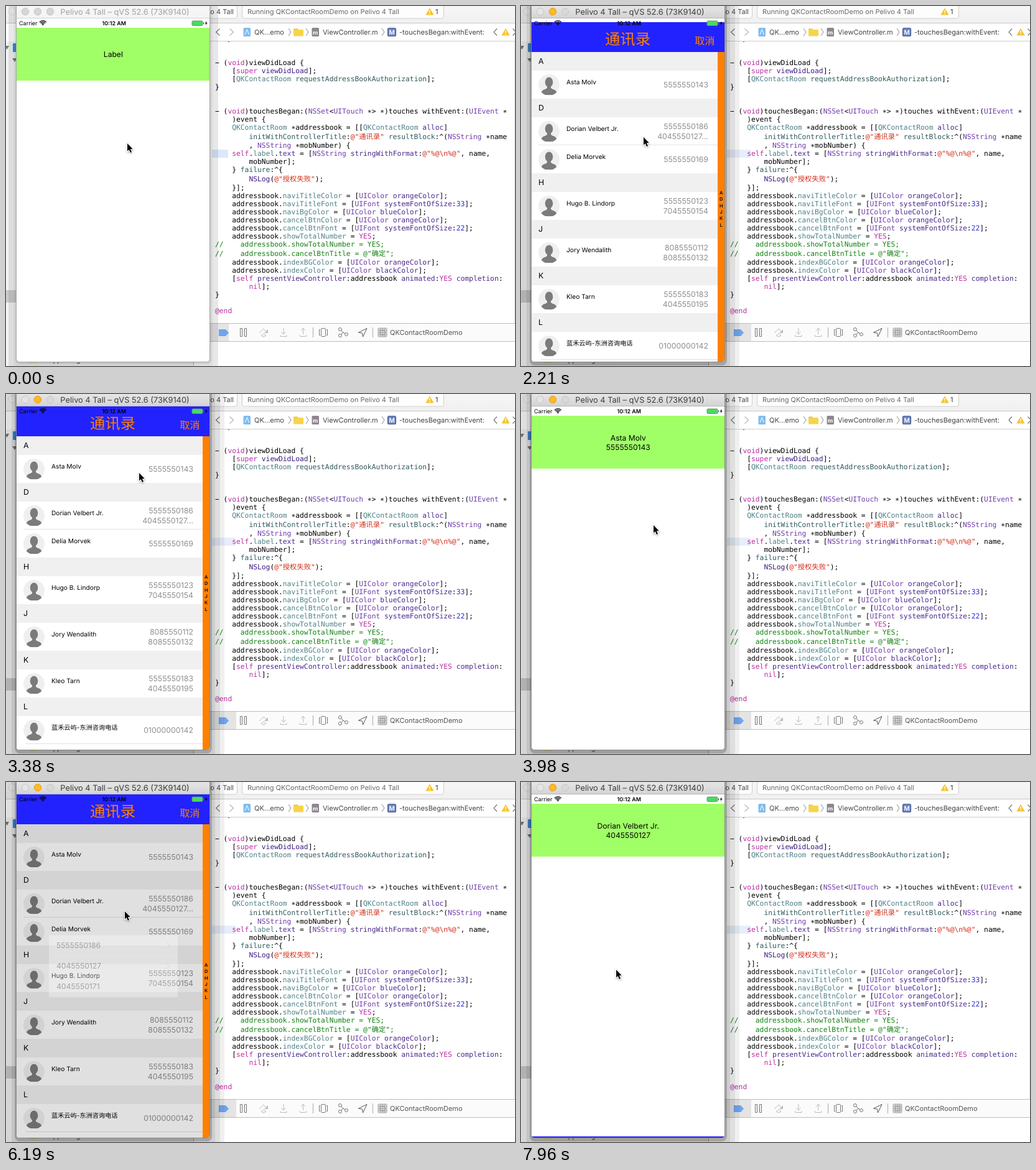
Recreate the animation shown at these times as an HTML page with a canvas. Size 818x579 px, loop 8000 ms.

```html
<!DOCTYPE html>
<html lang="en">
<head>
<meta charset="utf-8">
<title>Contact picker demo</title>
<style>
html, body { margin: 0; width: 100%; height: 100%; overflow: hidden; background: #fff; }
canvas { display: block; }
</style>
</head>
<body>
<canvas id="stage" width="818" height="579"></canvas>
<script>
const ctx = document.getElementById('stage').getContext('2d');
const LOOP = 8000, STEP = 147.4;
const SANS = 'Inter, "Noto Sans CJK SC", "Noto Sans CJK", sans-serif';
const MONO = '"DejaVu Sans Mono", "Noto Sans CJK SC", "Noto Sans CJK", monospace';
const SCREEN = { x: 17, y: 20, w: 310, h: 552 };
const BLUE = '#2222ff', ORANGE = '#ff8000';

// ---- drawing helpers ----
function rect(x, y, w, h, fill) {
  ctx.fillStyle = fill;
  ctx.fillRect(x, y, w, h);
}
function round(x, y, w, h, r, fill, stroke) {
  ctx.beginPath();
  ctx.roundRect(x, y, w, h, r);
  paint(fill, stroke);
}
function disc(x, y, r, fill, stroke) {
  ctx.beginPath();
  ctx.arc(x, y, r, 0, Math.PI * 2);
  paint(fill, stroke);
}
function poly(points, fill, stroke, open) {
  ctx.beginPath();
  for (let i = 0; i < points.length; i += 2) ctx.lineTo(points[i], points[i + 1]);
  if (!open) ctx.closePath();
  paint(fill, stroke);
}
function paint(fill, stroke) {
  if (fill) { ctx.fillStyle = fill; ctx.fill(); }
  if (stroke) { ctx.strokeStyle = stroke; ctx.stroke(); }
}
// y is the vertical middle of the capitals
function text(s, x, y, size, color, align = 'left', weight = 400) {
  ctx.font = `${weight} ${size}px ${SANS}`;
  ctx.textAlign = align;
  ctx.fillStyle = color;
  ctx.fillText(s, x, y + size * 0.365);
}
function chevron(x, y, w, h, color) {
  poly([x - w / 2, y - h / 2, x + w / 2, y, x - w / 2, y + h / 2], null, color, true);
}
function warning(x, y) {
  ctx.lineJoin = 'round';
  poly([x, y - 5, x + 5.8, y + 5, x - 5.8, y + 5], '#f7c32e', '#f7c32e');
  ctx.lineJoin = 'miter';
  rect(x - 0.7, y - 2.5, 1.4, 4, '#fff');
  rect(x - 0.7, y + 2.6, 1.4, 1.4, '#fff');
}

// ---- code editor ----
// the wide minus and centred asterisk mimic the editor font
const CODE = `- (void)viewDidLoad {
    [super viewDidLoad];
    [QKContactRoom requestAddressBookAuthorization];
}


- (void)touchesBegan:(NSSet<UITouch *> *)touches withEvent:(UIEvent *
    )event {
    QKContactRoom *addressbook = [[QKContactRoom alloc]
        initWithControllerTitle:@"通讯录" resultBlock:^(NSString *name
        , NSString *mobNumber) {
    self.label.text = [NSString stringWithFormat:@"%@\\n%@", name,
        mobNumber];
    } failure:^{
        NSLog(@"授权失败");
    }];
    addressbook.naviTitleColor = [UIColor orangeColor];
    addressbook.naviTitleFont = [UIFont systemFontOfSize:33];
    addressbook.naviBgColor = [UIColor blueColor];
    addressbook.cancelBtnColor = [UIColor orangeColor];
    addressbook.cancelBtnFont = [UIFont systemFontOfSize:22];
    addressbook.showTotalNumber = YES;
//    addressbook.showTotalNumber = YES;
//    addressbook.cancelBtnTitle = @"确定";
    addressbook.indexBGColor = [UIColor orangeColor];
    addressbook.indexColor = [UIColor blackColor];
    [self presentViewController:addressbook animated:YES completion:
        nil];
}

@end`.replace(/\*/g, '∗').replace(/^- /gm, '− ').split('\n');

const RULES = [
  [/^\/\/.*/, '#128212'],
  [/^@"[^"]*"/, '#d12f1b'],
  [/^(void|super|self|YES|nil|@end)\b/, '#ba2da2'],
  [/^(NSLog\b|viewDidLoad(?=]))/, '#3d1d81'],
  [/^(NS|UI)[A-Z]\w*/, '#703daa'],
  [/^QKContactRoom\b/, '#4f8187'],
  [/^(label|(navi|cancelBtn|index|showTotal)[A-Z]\w*)\b/, '#4f8187'],
  [/^(text|alloc|stringWithFormat|systemFontOfSize|presentViewController|animated|completion|(orange|blue|black)Color)\b/, '#4b2a8c'],
  [/^(initWithControllerTitle|resultBlock|failure|requestAddressBookAuthorization)\b/, '#31595d'],
  [/^\d+/, '#272ad8'],
  [/^(\w+|\s+|.)/, '#000']
];
function tokens(line) {
  const out = [];
  while (line) {
    const [re, color] = RULES.find(r => r[0].test(line));
    const word = line.match(re)[0];
    out.push([word, color]);
    line = line.slice(word.length);
  }
  return out;
}
const LINES = CODE.map(tokens);

function drawCode() {
  ctx.font = `11.3px ${MONO}`;
  ctx.textAlign = 'left';
  let y = 95;
  LINES.forEach((line, i) => {
    const tall = /[\u4e00-\u9fff]/.test(CODE[i]);
    if (tall) y += 2;
    let x = 336;
    for (const [word, color] of line) {
      ctx.fillStyle = color;
      ctx.fillText(word, x, y);
      x += ctx.measureText(word).width;
    }
    y += tall ? 14 : 13;
  });
}

function drawTopBars() {
  const g = ctx.createLinearGradient(0, 0, 0, 28);
  g.addColorStop(0, '#f6f6f6');
  g.addColorStop(1, '#f0f0f0');
  rect(0, 0, 818, 28, g);
  round(250.5, -8.5, 121, 28.5, 4, '#fdfdfd', '#cfcfcf');
  text('Pelivo 4 Tall', 366, 9, 11, '#4a4a4a', 'right');
  round(379.5, -8.5, 324, 28.5, 4, '#fdfdfd', '#cfcfcf');
  text('Running QKContactRoomDemo on Pelivo 4 Tall', 388, 9, 11, '#6a6a6a');
  warning(681, 9);
  text('1', 690, 9, 11, '#333');
  disc(10, 8.5, 6, '#f4f4f4', '#dcdcdc');

  rect(0, 27, 818, 1, '#c9c9c9');
  rect(0, 28, 818, 28, '#fff');
  rect(328, 56, 490, 1, '#cfcfcf');
  ctx.lineWidth = 1.2;
  chevron(340.5, 42, -6, 11, '#777');
  chevron(362.5, 42, 6, 11, '#b5b5b5');
  round(381.5, 35, 11.5, 14, 1.5, '#7fbcef');
  poly([384, 46, 387.3, 38, 390.6, 46], null, '#e4f2ff', true);
  text('QK...emo', 399, 42, 11, '#444');
  round(462, 36.5, 7, 4, 1, '#e8c030');
  round(462, 38, 16, 10.5, 1, '#f6d44c');
  round(491.5, 35, 11.5, 14, 1.5, '#8f8790');
  text('m', 497.2, 43, 9, '#fff', 'center', 700);
  text('ViewController.m', 509, 42, 11, '#444');
  for (const x of [456, 484, 606]) chevron(x, 42, 4, 12, '#a5a5a5');
  round(613.5, 35.5, 13, 13, 2, '#6d84bd', '#4a62a0');
  text('M', 620, 42, 10, '#fff', 'center', 600);
  text('-touchesBegan:withEvent:', 632, 42, 11, '#444');
  chevron(786.5, 42, -5, 11, '#777');
  warning(803, 42);
  chevron(817, 42, 5, 11, '#777');
  ctx.lineWidth = 1;
}

function drawDebugBar(edge) {
  rect(328, 511, 490, 28, '#fbfbfb');
  rect(328, 510, 490, 1, '#bdbdbd');
  rect(328, 539, 490, 1, '#bdbdbd');
  rect(328, 511, edge - 328, 28, '#e4e4e4');
  poly([342, 520, 353, 520, 358, 525.5, 353, 531, 342, 531], '#6ea5ee');
  const ink = '#777', faint = '#bdbdbd';
  for (const x of [376.5, 383.5]) round(x, 518.5, 3, 13, 0, null, ink);
  poly([407, 526, 414, 519, 420, 525], null, faint, true);
  poly([421, 520, 421, 526, 415, 526], faint);
  poly([410, 530, 414, 527, 418, 530, 414, 532], null, faint);
  for (const [x, d] of [[446, 1], [477.5, -1]]) {
    poly([x, 518, x, 528], null, faint, true);
    const tip = d > 0 ? 528 : 518;
    poly([x - 3.5, tip - d * 4, x, tip, x + 3.5, tip - d * 4], null, faint, true);
    poly([x - 5, 529, x - 5, 531.5, x + 5, 531.5, x + 5, 529], null, faint, true);
  }
  rect(493, 517, 1, 16, '#aaa');
  rect(589, 517, 1, 16, '#aaa');
  round(506.5, 518.5, 7, 13, 1, null, ink);
  poly([505, 520.5, 503.5, 520.5, 503.5, 529.5, 505, 529.5], null, ink, true);
  poly([515, 520.5, 516.5, 520.5, 516.5, 529.5, 515, 529.5], null, ink, true);
  poly([538, 521, 542, 525, 538, 529], null, ink, true);
  poly([542, 525, 546, 527.5], null, ink, true);
  for (const [x, y] of [[537, 520], [537, 530], [547, 528]]) disc(x, y, 2.5, '#fbfbfb', ink);
  poly([566.5, 525, 580, 518.5, 573.5, 532, 572.5, 526], null, '#555');
  round(598, 518, 14, 14, 1, '#d6d6d6', '#aaa');
  for (let i = 1; i < 4; i++) {
    rect(598 + i * 3.5, 518, 0.7, 14, '#999');
    rect(598, 518 + i * 3.5, 14, 0.7, '#999');
  }
  disc(605, 525, 4, null, '#999');
  text('QKContactRoomDemo', 617, 525, 11, '#555');
}

function drawSidebar() {
  rect(0, 57, 302, 522, '#f3f3f3');
  rect(301, 540, 1, 39, '#bbb');
  rect(0, 457, 17, 20, '#cacaca');
  poly([-2, 64, 5, 64, 1.5, 70], '#777');
  poly([10, 84, 18, 84, 14, 90], '#777');
  round(11, 60, 11, 14, 1, '#3f8cda');
  round(37, 562, 15, 11.5, 1, '#efc93c');
  text('Supporting Files', 62, 569, 11, '#333');
}

// ---- phone window ----
function drawWindow(active) {
  const bands = active
    ? [[23, 0.06], [16, 0.07], [8, 0.08], [3, 0.2]]
    : [[13, 0.09], [5, 0.04], [2, 0.08]];
  for (const [d, a] of bands)
    round(17 - d, -60, 311 + 2 * d, 632 + d + Math.min(d, 8), d + 5, `rgba(0,0,0,${a})`);
  round(16.5, -20, 311, 592.5, 5, '#fff', active ? '#8c8c8c' : '#a8a8a8');
  const g = ctx.createLinearGradient(0, 0, 0, 20);
  g.addColorStop(0, active ? '#e6e6e6' : '#f6f6f6');
  g.addColorStop(1, active ? '#d3d3d3' : '#f4f4f4');
  rect(17, 0, SCREEN.w, 20, g);
  rect(17, 19, SCREEN.w, 1, active ? '#b5b5b5' : '#d2d2d2');
  const lights = active ? ['#e4e4e4', '#fdb827', '#d8d8d8'] : ['#d6d6d6', '#d6d6d6', '#d6d6d6'];
  lights.forEach((c, i) => disc(31 + i * 20, 9, 5.7, c, active && i === 1 ? '#e0a020' : '#c6c6c6'));
  text('Pelivo 4 Tall – qVS 52.6 (73K9140)', 191, 9, 12.8, active ? '#3c3c3c' : '#a2a2a2', 'center');
}

function drawStatus() {
  text('Carrier', 21, 28, 9, '#000');
  text('10:12 AM', 173.7, 28, 8.9, '#000', 'center', 600);
  ctx.lineWidth = 1.3;
  for (const r of [2.8, 5.2, 7.4]) {
    ctx.beginPath();
    ctx.arc(59.3, 31, r, -Math.PI * 0.76, -Math.PI * 0.24);
    paint(null, '#000');
  }
  ctx.lineWidth = 1;
  disc(59.3, 30.3, 1, '#000');
  round(299, 24, 17, 7.5, 1.5, '#4cd964', '#5a9c64');
  rect(317, 26.3, 1.2, 3, '#555');
  poly([322.4, 23.8, 319.8, 28.3, 321.6, 28.3, 320.8, 31.6, 323.6, 27, 321.8, 27], '#000');
}

const PICKS = [['Asta Molv', '5555550143'], ['Dorian Velbert Jr.', '4045550127']];
function drawHome(picked) {
  rect(17, 35, SCREEN.w, 85, '#a0ff66');
  if (picked < 0) return text('Label', 172.3, 78, 12.1, '#000', 'center');
  PICKS[picked].forEach((s, i) => text(s, 172.3, 71 + i * 14.8, 12.1, '#000', 'center'));
}

const SECTIONS = [
  ['A', [PICKS[0]]],
  ['D', [[PICKS[1][0], '5555550186', PICKS[1][1] + '...'], ['Delia Morvek', '5555550169']]],
  ['H', [['Hugo B. Lindorp', '5555550123', '7045550154']]],
  ['J', [['Jory Wendalith', '8085550112', '8085550132']]],
  ['K', [['Kleo Tarn', '5555550183', '4045550195']]],
  ['L', [['蓝禾云屿-东洲咨询电话', '01000000142']]]
];

function avatar(x, y) {
  ctx.save();
  disc(x, y, 17, '#efefef');
  ctx.clip();
  ctx.beginPath();
  ctx.ellipse(x, y - 4.5, 6.3, 8, 0, 0, Math.PI * 2);
  paint('#7b7b7b');
  rect(x - 3, y, 6, 7, '#7b7b7b');
  ctx.beginPath();
  ctx.moveTo(x - 12.5, y + 16);
  ctx.quadraticCurveTo(x - 13, y + 8.5, x - 7, y + 7);
  ctx.quadraticCurveTo(x - 3, y + 6, x - 2.5, y + 3);
  ctx.lineTo(x + 2.5, y + 3);
  ctx.quadraticCurveTo(x + 3, y + 6, x + 7, y + 7);
  ctx.quadraticCurveTo(x + 13, y + 8.5, x + 12.5, y + 16);
  paint('#7b7b7b');
  ctx.restore();
}

function drawRow([name, ...phones], y) {
  avatar(45, y + 23);
  text(name, 73, y + 18, 10.2, '#000');
  const ys = phones.length > 1 ? [15, 31] : [23];
  phones.forEach((p, i) => text(p, 301, y + ys[i], 12.3, '#8e8e8e', 'right'));
}

function drawList(dim) {
  rect(17, 20, SCREEN.w, 552, '#fff');
  let y = 68;
  for (const [letter, rows] of SECTIONS) {
    rect(17, y, 299, 30, '#f0f0f0');
    text(letter, 28, y + 15, 12.3, '#000');
    y += 30;
    rows.forEach((row, i) => {
      if (i) rect(28, y - 1, 288, 1, '#e4e4e4');
      drawRow(row, y);
      y += 45;
    });
  }
  rect(32, y - 1, 284, 1, '#e0e0e0');
  if (dim > 0) drawPopup(dim);
  rect(316, 68, 11, 504, ORANGE);
  SECTIONS.forEach(([c], i) => text(c, 321.7, 294 + i * 10.4, 7.4, '#000', 'center', 600));
  rect(17, 20, SCREEN.w, 48, BLUE);
  text('通讯录', 171.5, 47.5, 24.4, ORANGE, 'center');
  text('取消', 311.5, 50, 16.2, ORANGE, 'right');
}

function drawPopup(alpha) {
  rect(17, 68, 299, 504, `rgba(0,0,0,${0.4 * alpha})`);
  ctx.save();
  ctx.globalAlpha = alpha;
  rect(69, 246.5, 207, 99.5, '#fff');
  ['5555550186', PICKS[1][1], '4045550171'].forEach((p, i) => {
    const y = 263 + i * 33;
    text(p, 81, y, 12.2, '#000');
    ctx.lineWidth = 1.4;
    chevron(260.5, y, 5, 9, '#c7c7cc');
    if (i < 2) rect(81, y + 16, 195, 1, '#ededed');
  });
  ctx.restore();
}

// ---- motion ----
const PATH = [
  [0, 195, 221], [1, 195, 221], [2, 196, 217], [3, 197, 211], [15, 197, 211],
  [19, 214, 146], [21, 214, 127], [23, 214, 127], [27, 213, 211], [29, 157, 236],
  [33, 157, 236], [34, 160, 233], [38, 191, 209], [39, 191, 208], [43, 191, 208], [47, 153, 302]
];
function cursorAt(k) {
  const i = PATH.findIndex(p => p[0] > k);
  if (i < 0) return PATH[PATH.length - 1].slice(1);
  const a = PATH[i - 1], b = PATH[i], f = (k - a[0]) / (b[0] - a[0]);
  return [a[1] + (b[1] - a[1]) * f, a[2] + (b[2] - a[2]) * f];
}
function drawCursor(x, y) {
  ctx.save();
  ctx.translate(x, y);
  ctx.shadowColor = 'rgba(0,0,0,.35)';
  ctx.shadowBlur = 3;
  ctx.shadowOffsetY = 1;
  ctx.lineWidth = 2;
  const arrow = [0, 0, 0, 12.6, 2.8, 10, 4.9, 14.9, 7, 14, 4.9, 9.2, 8.7, 9.1];
  poly(arrow, null, '#fff');
  ctx.shadowColor = 'transparent';
  poly(arrow, '#000');
  ctx.restore();
}

// critically damped settle from 1 to 0
const settle = s => (1 + 18.26 * s) * Math.exp(-18.26 * s);
const SLIDES = [1.85, 3.25, 4.54, 7.53];
function sheetOffset(t) {
  const n = SLIDES.filter(s => s <= t).length;
  if (!n) return SCREEN.h;
  const left = settle(t - SLIDES[n - 1]);
  return SCREEN.h * (n % 2 ? left : 1 - left);
}

function draw(ms) {
  const k = Math.floor((ms + 9) / STEP), t = k * STEP / 1000;
  const active = k >= 12, offset = sheetOffset(t);
  const edge = active ? 370 : 358;
  rect(0, 0, 818, 579, '#fff');
  drawSidebar();
  drawTopBars();
  rect(331, 231, edge - 332, 13, active ? '#e6eef9' : '#dbe8f8');
  rect(357, 57, 2, 1, '#555');
  drawCode();
  drawDebugBar(edge);
  rect(817, 57, 1, 453, '#e2e2e2');
  drawWindow(active);

  ctx.save();
  ctx.beginPath();
  ctx.roundRect(SCREEN.x, SCREEN.y, SCREEN.w, SCREEN.h, [0, 0, 4, 4]);
  ctx.clip();
  drawHome(t < SLIDES[1] ? -1 : t < 7.5 ? 0 : 1);
  if (offset < SCREEN.h - 0.5) {
    ctx.save();
    ctx.translate(0, Math.round(offset));
    drawList(t < 7.5 ? Math.min(1, Math.max(0, (t - 6.1) / 0.3)) : 0);
    ctx.restore();
  }
  drawStatus();
  ctx.restore();
  drawCursor(...cursorAt(k));
}

ctx.textRendering = 'geometricPrecision';
const start = performance.now();
function tick() {
  draw((performance.now() - start) % LOOP);
  requestAnimationFrame(tick);
}
tick();
</script>
</body>
</html>
```
